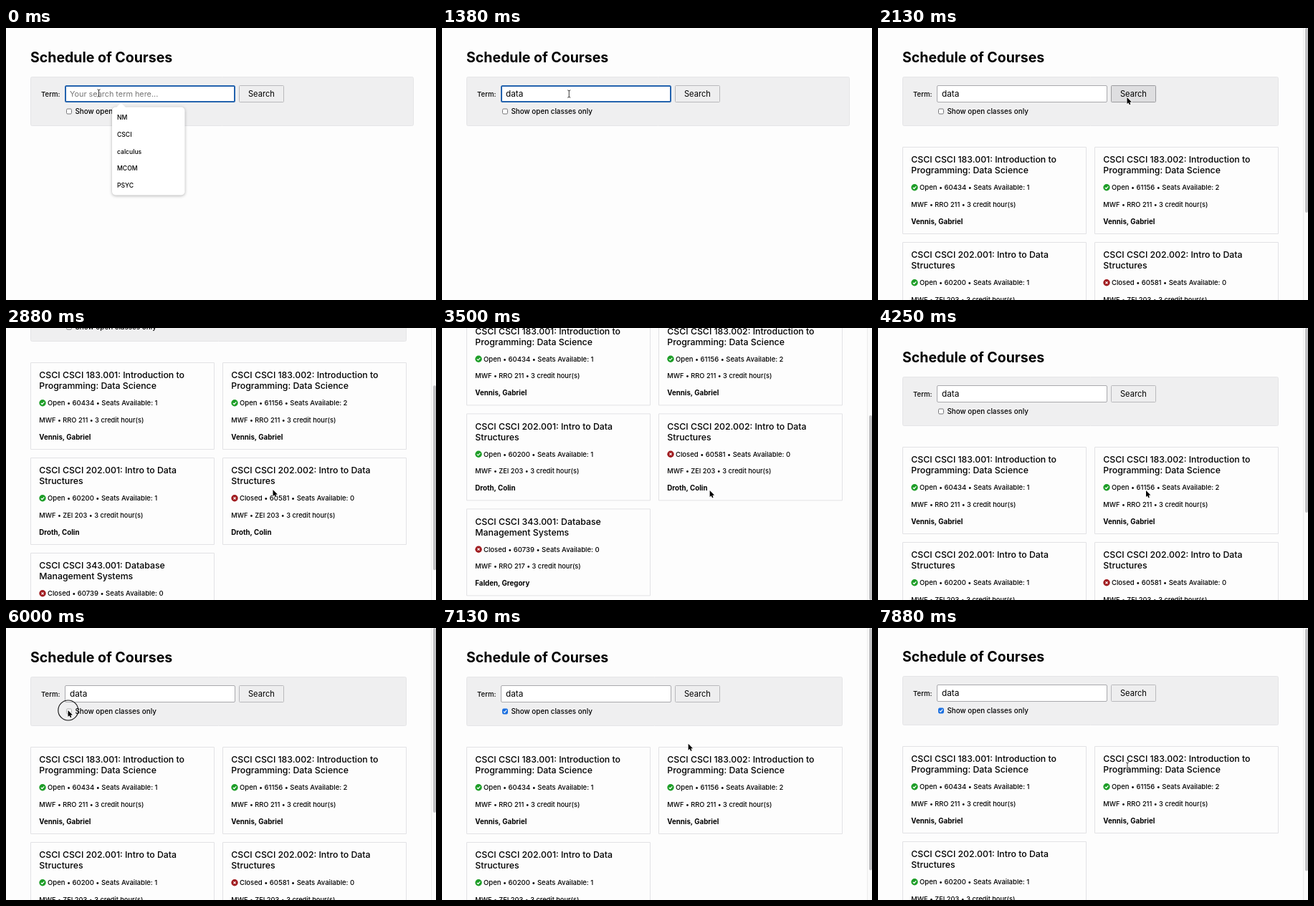
Write an HTML page with a canvas that moves like this. It is 600x380 px and loops after 8000 ms.

```html
<!DOCTYPE html>
<html lang="en">
<head>
<meta charset="utf-8">
<title>Schedule of Courses</title>
<style>
html, body { margin: 0; width: 100%; height: 100%; overflow: hidden; background: #fdfdfd; }
canvas { display: block; width: 600px; height: 380px; }
</style>
</head>
<body>
<canvas id="stage"></canvas>
<script>
const W = 600, H = 380, LOOP = 8000, STEP = 125;
const canvas = document.getElementById('stage');
const ctx = canvas.getContext('2d');
const dpr = window.devicePixelRatio || 1;
canvas.width = W * dpr;
canvas.height = H * dpr;

const INPUT = { x: 82, y: 80, w: 238, h: 24 };
const BUTTON = { x: 325, y: 80, w: 63, h: 24 };
const TYPE_AT = 500, CLICK_AT = 1750, RESULTS_AT = 2000;
const CHECK_AT = 6000, FILTER_AT = 6500;

const course = (code, lines, open, id, seats, place, teacher) =>
  ({ code, lines, open, id, seats, place, teacher });
const intro = ['Introduction to', 'Programming: Data Science'];
const structures = ['Intro to Data', 'Structures'];
const courses = [
  course('183.001', intro, true, 60434, 1, 'RRO 211', 'Vennis, Gabriel'),
  course('183.002', intro, true, 61156, 2, 'RRO 211', 'Vennis, Gabriel'),
  course('202.001', structures, true, 60200, 1, 'ZEI 203', 'Droth, Colin'),
  course('202.002', structures, false, 60581, 0, 'ZEI 203', 'Droth, Colin'),
  course('343.001', ['Database', 'Management Systems'], false, 60739, 0, 'RRO 217', 'Falden, Gregory')
];

// Each key: time, then values
const scrollKeys = [
  [2500, 0], [2625, 8], [2750, 50], [2875, 118], [3000, 179.6],
  [4000, 179.6], [4125, 60], [4250, 0], [7500, 0], [7875, 1]
];
const cursorKeys = [
  [0, 129.5, 91], [1250, 129.5, 91], [1500, 225, 93], [1750, 347.5, 97],
  [2375, 347.5, 97], [2750, 372.5, 226], [3125, 372.5, 226], [3250, 373, 227],
  [3625, 374, 227], [4250, 374, 227], [4750, 250, 172], [5125, 128, 127],
  [5500, 86.5, 115], [6375, 86.5, 115], [6875, 335, 99], [7250, 348, 193]
];

function at(keys, t) {
  if (t <= keys[0][0]) return keys[0].slice(1);
  for (let i = 1; i < keys.length; i++) {
    const a = keys[i - 1], b = keys[i];
    if (t <= b[0]) {
      const p = (t - a[0]) / (b[0] - a[0]);
      return a.slice(1).map((v, j) => v + (b[j + 1] - v) * p);
    }
  }
  return keys[keys.length - 1].slice(1);
}

const inside = (x, y, r) => x >= r.x && x <= r.x + r.w && y >= r.y && y <= r.y + r.h;

function text(s, x, y, size, weight = 400, color = '#000') {
  ctx.font = `${weight} ${size}px Inter, "Open Sans", sans-serif`;
  ctx.fillStyle = color;
  ctx.fillText(s, x, y);
}

function box(x, y, w, h, r, fill, stroke, line = 1) {
  ctx.beginPath();
  ctx.roundRect(x + line / 2, y + line / 2, w - line, h - line, r);
  ctx.fillStyle = fill;
  ctx.fill();
  if (stroke) {
    ctx.strokeStyle = stroke;
    ctx.lineWidth = line;
    ctx.stroke();
  }
}

function path(points, color, width) {
  ctx.beginPath();
  points.forEach(([x, y]) => ctx.lineTo(x, y));
  ctx.strokeStyle = color;
  ctx.lineWidth = width;
  ctx.stroke();
}

function statusIcon(x, y, open) {
  ctx.beginPath();
  ctx.arc(x, y, 4.7, 0, Math.PI * 2);
  ctx.fillStyle = open ? '#1e9e28' : '#a01c20';
  ctx.fill();
  if (open) {
    path([[x - 2.2, y + 0.1], [x - 0.6, y + 1.7], [x + 2.3, y - 1.4]], '#fff', 1.2);
  } else {
    path([[x - 1.5, y - 1.5], [x + 1.5, y + 1.5]], '#fff', 1.2);
    path([[x + 1.5, y - 1.5], [x - 1.5, y + 1.5]], '#fff', 1.2);
  }
}

function card(c, i) {
  const x = i % 2 ? 302 : 34;
  const y = 166 + Math.floor(i / 2) * 133;
  const left = x + 12.3;
  box(x, y, 257, 122, 0, '#fdfdfd', '#e2e2e5');
  text(`CSCI CSCI ${c.code}: ${c.lines[0]}`, left, y + 22.3, 12.3, 500);
  text(c.lines[1], left, y + 37.3, 12.3, 500);
  statusIcon(x + 17, y + 56.8, c.open);
  text(`${c.open ? 'Open' : 'Closed'} • ${c.id} • Seats Available: ${c.seats}`, x + 24, y + 60.4, 9.5, 500);
  text(`MWF • ${c.place} • 3 credit hour(s)`, left, y + 84, 9.25, 500);
  text(c.teacher, left, y + 108, 9.7, 700);
}

function form(t, mx, my) {
  const focused = t < CLICK_AT;
  const typed = 'data'.slice(0, t < TYPE_AT ? 0 : 1 + Math.floor((t - TYPE_AT) / STEP));
  text('Schedule of Courses', 34, 48, 19.5, 700);
  box(34, 68, t < RESULTS_AT ? 535 : 525, 69, 2, '#efeff0', '#e5e5e7');
  text('Term:', 49, 95.6, 9.6, 500);

  const f = INPUT, b = BUTTON;
  box(f.x, f.y, f.w, f.h, 1.5, '#fff', focused ? '#2463ae' : '#a9a9ad', focused ? 2 : 1);
  if (typed) text(typed, 89, 96, 11.8);
  else text('Your search term here...', 89, 96, 10.85, 400, '#757575');

  const hover = inside(mx, my, b);
  box(b.x, b.y, b.w, b.h, 1, hover ? '#dedee0' : '#eeeeef', hover ? '#9c9c9f' : '#b9b9bc');
  text('Search', 338, 96, 11.1);

  const checked = t > CHECK_AT;
  const pressed = t === CHECK_AT;
  box(84, 112.5, 8, 8, 1.5, checked ? '#1a6fe0' : '#fff',
    checked ? '#1a6fe0' : pressed ? '#b0b0b0' : '#77777a');
  if (checked) path([[85.9, 116.6], [87.4, 118.2], [90.2, 114.6]], '#fff', 1.2);
  text('Show open classes only', 96.5, 120.4, 9.85, 500);
}

function suggestions() {
  ctx.save();
  ctx.shadowColor = 'rgba(0,0,0,.3)';
  ctx.shadowBlur = 4 * dpr;
  ctx.shadowOffsetY = dpr;
  box(147.5, 110, 102.5, 124, 5, '#fff');
  ctx.restore();
  ctx.beginPath();
  ctx.moveTo(154, 111);
  ctx.lineTo(160.5, 104.5);
  ctx.lineTo(167, 111);
  ctx.fillStyle = '#fff';
  ctx.fill();
  ['NM', 'CSCI', 'calculus', 'MCOM', 'PSYC'].forEach((s, i) =>
    text(s, 155, 128 + i * 23.75, 8.6, 450));
}

function scrollbar(scroll, height) {
  ctx.fillStyle = '#fafafa';
  ctx.fillRect(593, 0, 7, H);
  ctx.fillStyle = '#ececec';
  ctx.fillRect(593, 0, 1, H);
  ctx.beginPath();
  ctx.roundRect(596, scroll * H / height, 4, H * H / height, 2);
  ctx.fillStyle = '#c1c1c3';
  ctx.fill();
}

function arrow(x, y) {
  const shape = [[0, 0], [0, 9], [2, 7.2], [3.4, 10.3], [4.9, 9.6], [3.6, 6.7], [6.4, 6.5]];
  ctx.beginPath();
  shape.forEach(([dx, dy]) => ctx.lineTo(x + dx, y + dy));
  ctx.closePath();
  ctx.lineJoin = 'round';
  ctx.lineWidth = 1.4;
  ctx.strokeStyle = '#fff';
  ctx.stroke();
  ctx.fillStyle = '#000';
  ctx.fill();
}

function beam(x, y) {
  const draw = (color, width) => {
    path([[x, y - 4.5], [x, y + 4.5]], color, width);
    path([[x - 2, y - 5.2], [x, y - 4.4], [x + 2, y - 5.2]], color, width);
    path([[x - 2, y + 5.2], [x, y + 4.4], [x + 2, y + 5.2]], color, width);
  };
  draw('rgba(255,255,255,.8)', 2);
  draw('#222', 0.9);
}

function cursor(t, x, y) {
  if (t >= TYPE_AT && t < 1375) return;
  const clicking = [CLICK_AT, CHECK_AT].some(c => t >= c && t < c + 2 * STEP);
  if (clicking) {
    ctx.beginPath();
    ctx.arc(x + 0.3, y, 14, 0, Math.PI * 2);
    ctx.strokeStyle = '#111';
    ctx.lineWidth = 1.1;
    ctx.stroke();
  }
  if (inside(x, y, INPUT) || t >= 7250) beam(x, y);
  else arrow(x, y);
}

function draw(now) {
  const t = Math.floor((now % LOOP) / STEP) * STEP;
  const [scroll] = at(scrollKeys, t);
  const [mx, my] = at(cursorKeys, t);
  const shown = t < RESULTS_AT ? [] : courses.filter(c => c.open || t < FILTER_AT);

  ctx.setTransform(dpr, 0, 0, dpr, 0, 0);
  ctx.fillStyle = '#fdfdfd';
  ctx.fillRect(0, 0, W, H);
  ctx.save();
  ctx.translate(0, -scroll);
  form(t, mx, my + scroll);
  shown.forEach(card);
  ctx.restore();

  if (t < TYPE_AT) suggestions();
  if (shown.length) scrollbar(scroll, 160.6 + Math.ceil(shown.length / 2) * 133);
  cursor(t, mx, my);
}

const start = performance.now();
function tick() {
  draw(performance.now() - start);
  requestAnimationFrame(tick);
}
tick();
</script>
</body>
</html>
```
